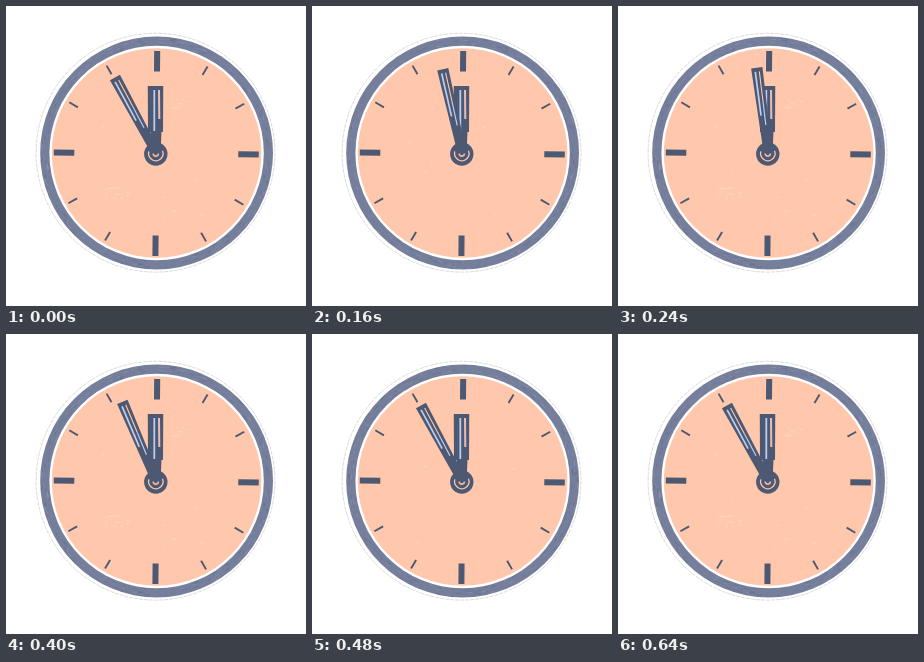
An HTML page with a canvas that plays this animation: 300 px wide and 300 px high, repeating every 720 ms.

```html
<!DOCTYPE html>
<html lang="en">
<head>
<meta charset="utf-8">
<title>Clock</title>
<style>
html, body { margin: 0; height: 100%; overflow: hidden; background: #fff; }
canvas { display: block; width: 300px; height: 300px; }
</style>
</head>
<body>
<canvas id="stage" width="300" height="300"></canvas>
<script>
const c = document.getElementById('stage').getContext('2d');
const STEP = 80, COUNT = 9, TURN = 2 * Math.PI;
const PEACH = '#ffc8ad', INK = '#4d5872', RING = '#757e9b', SKY = '#b9cef0';

function seeded(seed) {
  return () => (seed = seed * 16807 % 2147483647) / 2147483647;
}

function disc(x, y, r, color) {
  c.fillStyle = color;
  c.beginPath();
  c.arc(x, y, r, 0, TURN);
  c.fill();
}

function arc(x, y, r, from, to, color, width) {
  c.strokeStyle = color;
  c.lineWidth = width;
  c.beginPath();
  c.arc(x, y, r, from, to);
  c.stroke();
}

function line(x1, y1, x2, y2, color, width) {
  c.strokeStyle = color;
  c.lineWidth = width;
  c.beginPath();
  c.moveTo(x1, y1);
  c.lineTo(x2, y2);
  c.stroke();
}

// Upright bar, centred on x, that narrows from top to bottom
function bar(x, top, bottom, wide, narrow) {
  c.fillStyle = INK;
  c.beginPath();
  c.moveTo(x - wide / 2, top);
  c.lineTo(x + wide / 2, top);
  c.lineTo(x + narrow / 2, bottom);
  c.lineTo(x - narrow / 2, bottom);
  c.fill();
}

function turned(x, y, degrees, draw) {
  c.save();
  c.translate(x, y);
  c.rotate(degrees * Math.PI / 180);
  draw();
  c.restore();
}

function specks(rnd, n, x, y, w, h) {
  for (let i = 0; i < n; i++) {
    const px = x + (rnd() - .5) * w, py = y + (rnd() - .5) * h;
    line(px, py, px + 1 + rnd() * 3, py + rnd() * 2, 'rgba(255,224,207,.8)', .7);
  }
}

function drawFace(paper) {
  const rnd = seeded(101 + paper * 977), x = 150.6, y = 147;
  c.setLineDash([4, 1]);
  arc(149.5, 146.7, 119.4, 0, TURN, '#c3c3c6', .6);
  c.setLineDash([]);
  disc(x, y, 116.4, RING);
  for (let i = 0; i < 220; i++) {
    const a = rnd() * TURN, color = rnd() < .5 ? 'rgba(84,94,122,.4)' : 'rgba(160,168,188,.4)';
    arc(x, y, 108 + rnd() * 8, a, a + .01 + rnd() * .04, color, .8);
  }
  disc(x, y, 107.2, '#fff');
  disc(x, y, 104.8, PEACH);
  if (paper === 0) {
    specks(rnd, 18, 105, 187, 34, 16);
    specks(rnd, 8, 174, 99, 18, 12);
  }
  specks(rnd, 8, 150, 150, 130, 130);
}

function drawTicks() {
  for (let hour = 0; hour < 12; hour++) {
    const quarter = hour % 3 === 0;
    turned(150.3, 147.5, hour * 30 + .5, () => {
      if (quarter) line(0, -82, 0, -102.5, INK, 6);
      else line(0, -91, 0, -101, INK, 1.9);
    });
  }
}

function drawHourHand() {
  bar(149.5, 80, 126, 15.5, 15);
  bar(150, 126, 147, 11, 9);
  line(148.3, 84, 148.3, 125, SKY, 1.8);
  line(153, 84, 153.3, 113, '#e6bdb9', 2);
}

function drawMinuteHand(angle) {
  turned(150, 147, angle, () => {
    bar(0, -86, 0, 11.4, 8.6);
    line(-2, -82, -2, -38, SKY, 1.7);
    line(2, -82, 1.8, -52, PEACH, 1.1);
    line(1.8, -52, 1.5, -28, SKY, 1.2);
  });
}

function drawHub() {
  disc(149.8, 148, 11.7, INK);
  arc(149.8, 147.5, 7.3, -.4, Math.PI + .3, PEACH, 1.3);
  arc(149.8, 147.5, 2.6, 0, Math.PI, '#edb5a2', 1.6);
}

// Swings forward and back over six steps, then rests
function handAngle(i) {
  const u = Math.max(0, 1 - Math.abs(i - 3) / 3);
  return -28.5 + 21 * u * u * (3 - 2 * u);
}

function frame(now) {
  const i = Math.floor(now / STEP) % COUNT;
  c.fillStyle = '#fff';
  c.fillRect(0, 0, 300, 300);
  drawFace(i % 5 % 3);
  drawTicks();
  drawHourHand();
  drawMinuteHand(handAngle(i));
  drawHub();
  requestAnimationFrame(frame);
}
frame(0);
</script>
</body>
</html>
```
